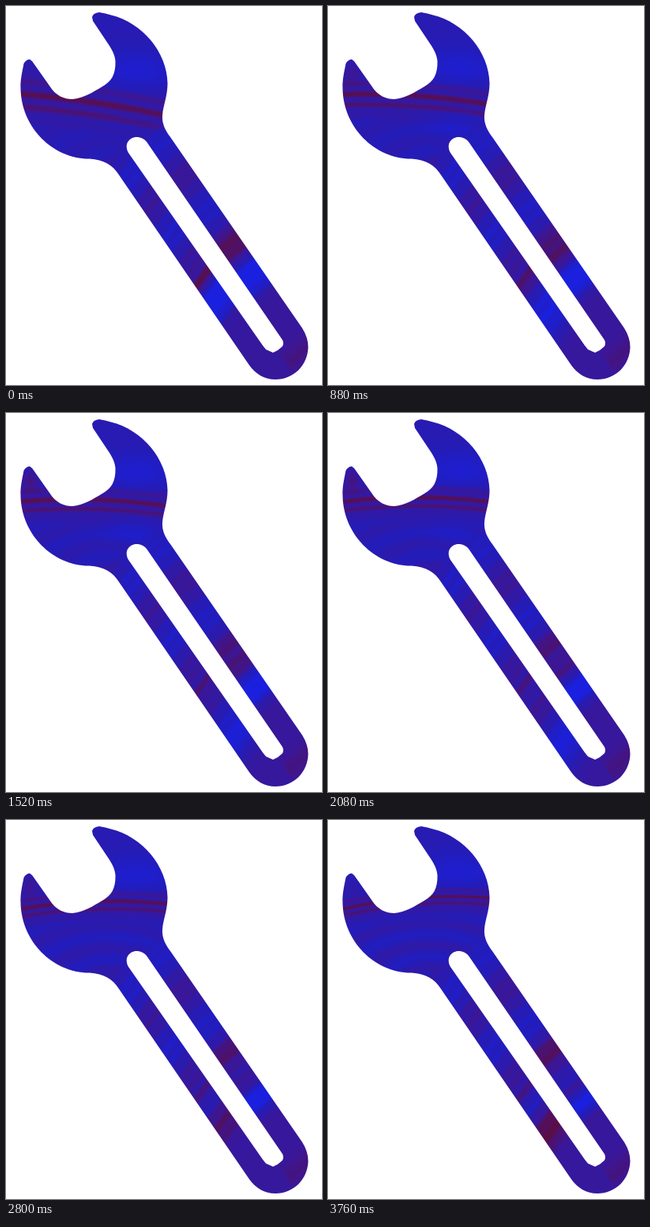
Write an HTML page with a canvas that moves like this. It is 400 px wide and 480 px high and loops after 3.84 s.

```html
<!DOCTYPE html>
<html lang="en">
<head>
<meta charset="utf-8">
<title>Marbled wrench</title>
<style>
  html, body { margin: 0; width: 100%; height: 100%; overflow: hidden; background: #fff; }
  canvas { display: block; width: 400px; height: 480px; }
</style>
</head>
<body>
<canvas id="stage" width="400" height="480"></canvas>
<script>
const W = 400, H = 480, LOOP = 3840, STEP = 80;
const ctx = document.getElementById('stage').getContext('2d', { willReadFrequently: true });

const wrench = new Path2D(`
  M109 14 Q110 9 118 8 Q126 9 133 11.5 C172 21 204 58 204.5 98
  C204.5 114 199 126 198 138 C197 149 202 158 208 166
  L375 408 C380 416 382.5 424 382.5 432 C382 455 364 473 341 473
  C327 473 316 466 308 455 L143 214 C135 201 124 195 106 193.5
  C60 194 19 154 18.5 104 C18 93 21 81 22.5 73 Q25 68 30 67.5 Q33 69 36 74
  L55 101 C63 114 74 118 84 118 C98 117 110 109 122 102
  C133 96 139 87 138.5 70 C138 62 134 55 130 49 L110 19 Z
  M155 186 C148 172 159 165 167 166 Q174 167 178 172
  L350 423 Q352 427 350 431 L344 436 L338 439 L329 435 L325 430 Z`);

const mix = (a, b, k) => a + (b - a) * k;
const clamp = v => Math.max(0, Math.min(1, v));
const smooth = (a, b, v) => { const k = clamp((v - a) / (b - a)); return k * k * (3 - 2 * k); };
const bump = (d, w) => Math.exp(-d * d / (w * w));
const wave = (d, period) => Math.cos(2 * Math.PI * d / period);

// Ramp from bright blue over violet to maroon
const RAMP = [[26, 32, 222], [36, 28, 184], [60, 22, 148], [90, 14, 72]];
function shade(v) {
  const k = clamp(v) * 3, i = Math.min(2, Math.floor(k));
  return RAMP[i].map((c, n) => mix(c, RAMP[i + 1][n], k - i));
}
const PALETTE = Array.from({ length: 256 }, (_, i) => shade(i / 255));

// Stripes that flatten and tighten, with faint rings below them
function head(x, y, t) {
  const e = Math.pow(t, 0.7), p = (x - 20) / 180;
  const line = mix(128, 121, e) + p * mix(27, -14, e) - mix(12, 28, e) * p * (1 - p);
  const q = y - line, period = mix(17, 9, e);
  const stripes = 0.5 + 0.5 * wave(q, period);
  const ring = Math.hypot((x - 128) * 0.55, y - 200);
  return 0.38
    + bump(q + 0.8 * period, 1.4 * period) * (0.15 + 0.45 * stripes)
    + 0.1 * smooth(5, 30, q) * mix(0.4, 1, t) * wave(ring - 14 * t, 28)
    - 0.25 * bump(x - 165, 45) * bump(y - mix(82, 66, t), 22)
    - 0.2 * bump(x - 165, 40) * bump(y - 148, 16) * bump(t - 0.3, 0.3)
    + 0.35 * bump(x - 30, 10) * bump(y - 85, 14) * bump(t - 0.5, 0.4);
}

// Height at which a band of slope k through (x, y) meets the arm's axis
const along = (x, y, x0, y0, m, k) => (y - k * (x - x0 + m * y0)) / (1 - k * m);

function rightArm(x, y, t) {
  const s = along(x, y, 203, 182, 0.674, -0.85);
  const body = 0.45 + 0.18 * wave(s - 300, 85) + 0.05 * wave(s, 13);
  return mix(body, 0.6, smooth(mix(355, 368, t), mix(378, 390, t), s))
    + 0.3 * bump(s - mix(307, 341, t), mix(15, 9, t))
    + mix(0.1, 0.28, t) * bump(s - 293, mix(5, 13, t))
    - 0.45 * bump(s - mix(340, 359, t), mix(14, 9, t))
    + 0.15 * bump(s - 437, 12);
}

function leftArm(x, y, t) {
  const s = along(x, y, 148, 197, 0.685, -1.4);
  const body = 0.43 + 0.17 * wave(s - 250, 74) + 0.07 * wave(s - 238, 13);
  const blue = 1 - smooth(0.55, 0.75, t);
  return mix(body, 0.58, smooth(385, 425, s))
    + 0.3 * bump(s - 345, 6)
    + mix(0.25, 0.45, t) * bump(s - mix(345, 387, t), mix(10, 20, t))
    - 0.5 * blue * bump(s - mix(374, 448, t), mix(15, 32, t));
}

function field(x, y, t) {
  const u = (x - 160) * 0.56 + (y - 180) * 0.83;
  const k = smooth(-15, 10, u);
  if (k === 0) return head(x, y, t);
  const arm = x > 176 + (y - 190) * 0.68 ? rightArm : leftArm;
  return k === 1 ? arm(x, y, t) : mix(head(x, y, t), arm(x, y, t), k);
}

ctx.fill(wrench, 'evenodd');
const image = ctx.getImageData(0, 0, W, H);

function draw(t) {
  const px = image.data;
  for (let i = 0; i < px.length; i += 4) {
    if (!px[i + 3]) continue;
    const n = i / 4, v = field(n % W, Math.floor(n / W), t);
    const c = PALETTE[Math.round(clamp(v) * 255)];
    px[i] = c[0];
    px[i + 1] = c[1];
    px[i + 2] = c[2];
  }
  ctx.putImageData(image, 0, 0);
}

const start = performance.now();
let shown = -1;
function tick() {
  const step = Math.floor((performance.now() - start) % LOOP / STEP);
  if (step !== shown) draw(step / (LOOP / STEP - 1));
  shown = step;
  requestAnimationFrame(tick);
}
tick();
</script>
</body>
</html>
```
